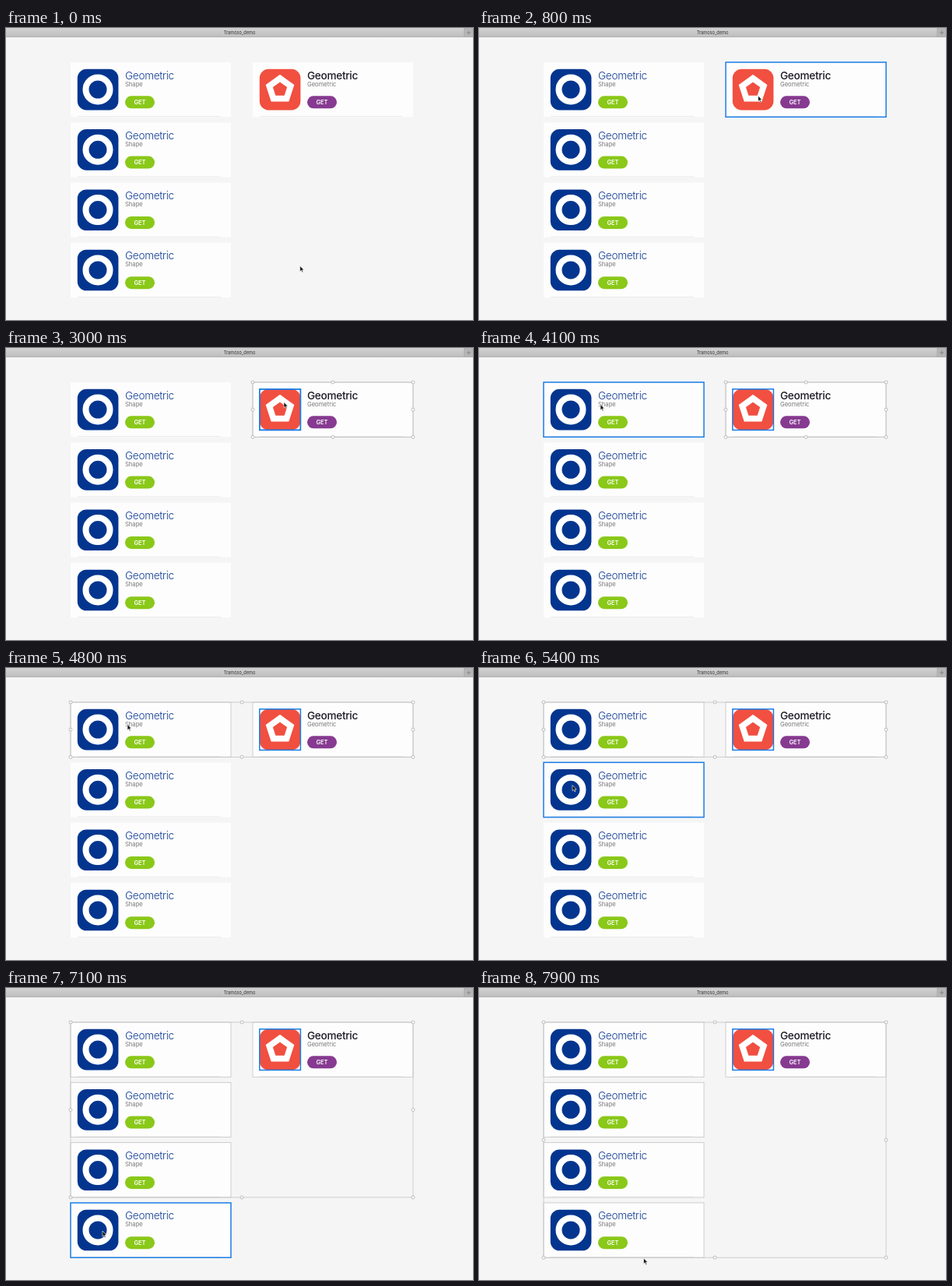
Animation, 600 px wide and 375 px high, one loop 8000 ms. Source, as an HTML page:

```html
<!DOCTYPE html>
<html lang="en">
<head>
<meta charset="utf-8">
<title>Card selection</title>
<style>
html, body { margin: 0; width: 100%; height: 100%; overflow: hidden; background: #f5f5f5; }
svg { display: block; width: 600px; height: 375px; font-family: Inter, Roboto, sans-serif; }
.name { font-size: 13.6px; letter-spacing: -.3px; }
.sub { font-size: 7.6px; fill: #78787c; }
.get { font-size: 7.5px; font-weight: 600; fill: #fff; text-anchor: middle; }
.edge { fill: none; stroke: #c4c4c4; stroke-width: .8; }
.hover { fill: none; stroke: #1b7ce6; stroke-width: 1.5; }
.knob { fill: #fff; stroke: #a2a2a2; stroke-width: .7; }
</style>
</head>
<body>
<svg viewBox="0 0 600 375">
  <defs>
    <linearGradient id="bar" x2="0" y2="1">
      <stop stop-color="#d2d2d2"/><stop offset="1" stop-color="#bdbdbd"/>
    </linearGradient>
  </defs>
  <rect width="600" height="11.5" fill="url(#bar)"/>
  <rect x="589" width="11" height="11.5" fill="#b5b5b5"/>
  <path d="M0 11.5H600M588.7 0V11.5" stroke="#a5a5a5" stroke-width=".7"/>
  <path d="M592 6H597M594.5 3.5V8.5" stroke="#777" stroke-width=".7"/>
  <text x="300" y="8" font-size="5.6" fill="#333" text-anchor="middle">Tramoso_demo</text>
  <g id="cards"></g>
  <g id="marks"></g>
  <path id="cursor" d="M0 0V7.2L1.7 5.7L2.9 8.5L4.1 8L2.9 5.3H5.2Z" fill="#111" stroke="#fff" stroke-width=".6"/>
</svg>
<script>
const LOOP = 8000, STEP = 100, W = 206, H = 70.3, PITCH = 77.3;
const $ = id => document.getElementById(id);

// Cards in the order they get selected
const cards = [{ x: 317, y: 44, red: true }];
for (let i = 0; i < 4; i++) cards.push({ x: 83, y: 44 + i * PITCH });

const clicks = [900, 4400, 5600, 6400, 7200];

// Pointer stops: time, x, y
const stops = [
  [300, 377.7, 305.5], [900, 357, 69.5], [3700, 357, 69.5], [4100, 156, 72.5],
  [4800, 156, 72.5], [5300, 120, 150.5], [5700, 120, 150.5], [6300, 123, 257.5],
  [6600, 123, 257.5], [7100, 124, 312], [7400, 124, 312], [7900, 211.5, 347]
];

const rect = (cls, x, y, w, h) =>
  `<rect class="${cls}" x="${x}" y="${y}" width="${w}" height="${h}"/>`;

const pentagon = (r, fill) => {
  const pts = [0, 1, 2, 3, 4].map(i => {
    const a = i * Math.PI * .4;
    return (35 + r * Math.sin(a)).toFixed(2) + ',' + (35 - r * Math.cos(a)).toFixed(2);
  });
  return `<polygon points="${pts.join(' ')}" fill="${fill}"/>`;
};

function card({ x, y, red }) {
  const main = red ? '#f14f40' : '#03358f';
  const shape = red
    ? pentagon(19.3, '#fff') + pentagon(9.6, main)
    : '<circle cx="35" cy="35" r="15.5" fill="none" stroke="#fff" stroke-width="8"/>';
  return `<g transform="translate(${x} ${y})">
    <rect width="${W}" height="${H}" fill="#fdfdfd"/>
    <path d="M9 69.6H193" stroke="#e2e2e2" stroke-width=".7"/>
    <rect x="8.8" y="8.8" width="52.6" height="52.6" rx="11.5" fill="${main}"/>${shape}
    <text class="name" x="70" y="21.5" font-weight="${red ? 500 : 300}" fill="${red ? '#1b1b25' : '#123d94'}">Geometric</text>
    <text class="sub" x="70" y="30.5">${red ? 'Geometric' : 'Shape'}</text>
    <rect x="70" y="43.3" width="38" height="16" rx="8" fill="${red ? '#863a90' : '#8ac819'}"/>
    <text class="get" x="89" y="54.1">GET</text>
  </g>`;
}

function pointer(t) {
  let a = stops[0];
  for (const b of stops) {
    if (t < b[0]) {
      const p = Math.max(0, (t - a[0]) / (b[0] - a[0] || 1));
      const e = p * p * (3 - 2 * p);
      return [a[1] + (b[1] - a[1]) * e, a[2] + (b[2] - a[2]) * e];
    }
    a = b;
  }
  return [a[1], a[2]];
}

const inside = (px, py, x, y, w, h) => px >= x && px <= x + w && py >= y && py <= y + h;
const icon = c => [c.x + 8.8, c.y + 8.8, 52.6, 52.6];

function selection(list) {
  const x0 = Math.min(...list.map(c => c.x)), x1 = Math.max(...list.map(c => c.x)) + W;
  const y0 = 44, y1 = Math.max(...list.map(c => c.y)) + H;
  let out = list.map(c => rect('edge', c.x, c.y, W, H)).join('') + rect('edge', x0, y0, x1 - x0, y1 - y0);
  for (const u of [0, .5, 1]) for (const v of [0, .5, 1])
    if (u !== .5 || v !== .5)
      out += `<circle class="knob" cx="${x0 + (x1 - x0) * u}" cy="${y0 + (y1 - y0) * v}" r="2"/>`;
  return out;
}

function draw(t) {
  const [px, py] = pointer(t);
  const count = clicks.filter(c => t >= c).length;
  let out = count ? rect('hover', ...icon(cards[0])) + selection(cards.slice(0, count)) : '';
  cards.forEach((c, i) => {
    const box = i < count ? icon(c) : [c.x, c.y, W, H];
    if (inside(px, py, ...box)) out += rect('hover', ...box);
  });
  $('marks').innerHTML = out;
  $('cursor').setAttribute('transform', `translate(${px} ${py})`);
}

$('cards').innerHTML = cards.map(card).join('');
const start = performance.now();
let last = -1;
function tick() {
  const t = Math.floor((performance.now() - start) % LOOP / STEP) * STEP;
  if (t !== last) draw(last = t);
  requestAnimationFrame(tick);
}
tick();
</script>
</body>
</html>
```
